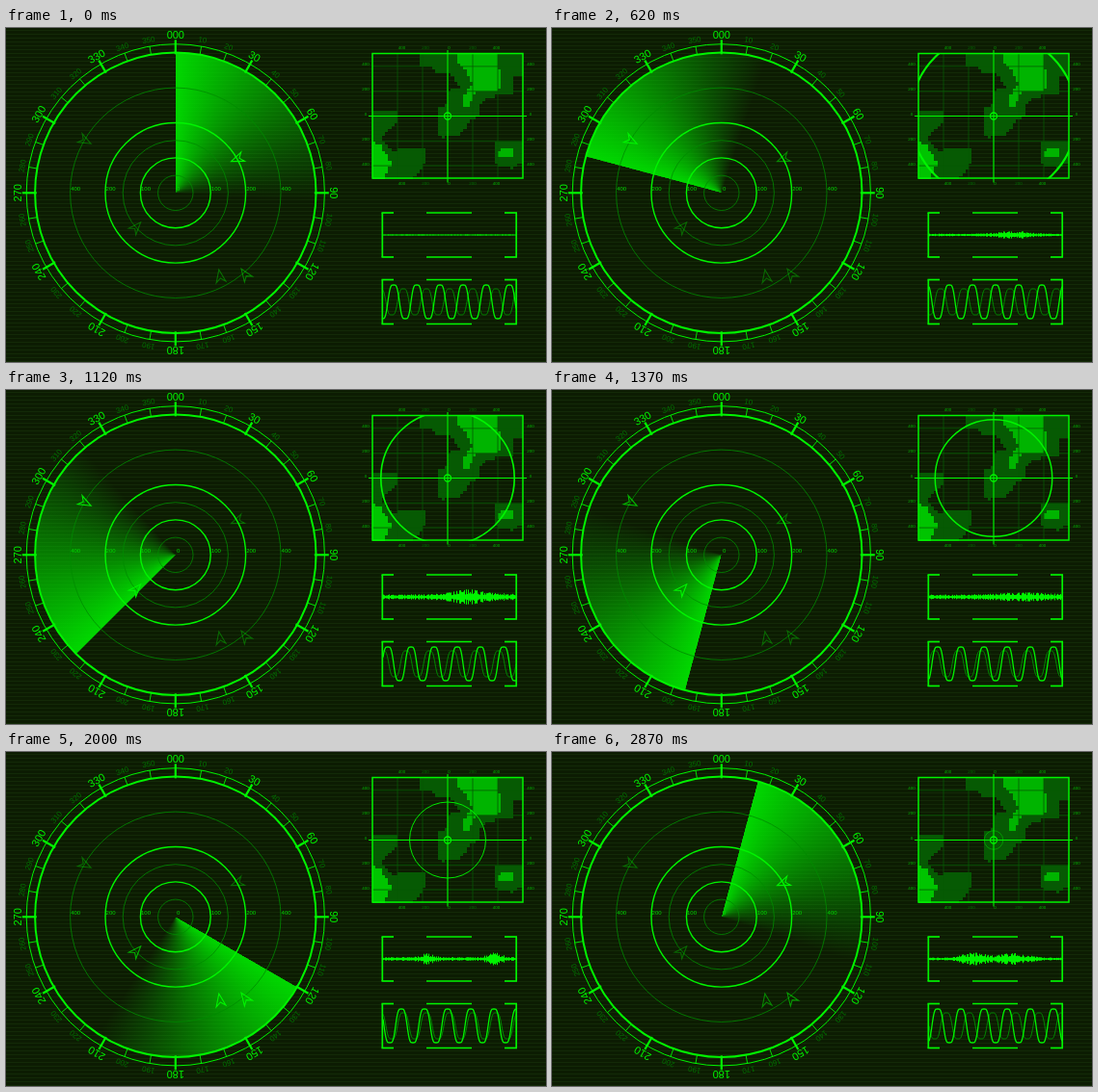
Recreate the animation shown at these times as an HTML page with a canvas. Size 560x347 px, loop 3000 ms.

```html
<!DOCTYPE html>
<html lang="en">
<head>
<meta charset="utf-8">
<title>Radar console</title>
<style>
html, body { margin: 0; width: 100%; height: 100%; overflow: hidden; background: #0c1c02; }
canvas, svg { position: absolute; left: 0; top: 0; width: 560px; height: 347px; }
text { font-family: "Liberation Sans", Arial, sans-serif; text-anchor: middle; }
</style>
</head>
<body>
<canvas id="stage" width="560" height="347"></canvas>
<svg id="labels" viewBox="0 0 560 347"></svg>
<script>
const ctx = document.getElementById('stage').getContext('2d');
const labels = document.getElementById('labels');
const W = 560, H = 347, LOOP = 3000, STEPS = 24;
const CX = 175.8, CY = 171.3, R = 145.7, UNIT = 36.4;
const MAP = { x: 380, y: 27, w: 156, h: 129.5, cx: 458, cy: 91.5 };
const GREEN = '#00f400', MID = '#008c00', DIM = '#007000';
const rad = deg => deg * Math.PI / 180;
const starts = Array.from({ length: STEPS }, (_, i) => Math.floor(i * 12.5) * 10);

function line(c, x1, y1, x2, y2, color, width) {
  c.strokeStyle = color;
  c.lineWidth = width;
  c.beginPath();
  c.moveTo(x1, y1);
  c.lineTo(x2, y2);
  c.stroke();
}

function ring(c, x, y, r, color, width) {
  c.strokeStyle = color;
  c.lineWidth = width;
  c.beginPath();
  c.arc(x, y, r, 0, 2 * Math.PI);
  c.stroke();
}

function layer(paint) {
  const cv = document.createElement('canvas');
  cv.width = W;
  cv.height = H;
  paint(cv.getContext('2d'));
  return cv;
}

function label(str, x, y, size, color, turn = 0) {
  const el = document.createElementNS('http://www.w3.org/2000/svg', 'text');
  el.textContent = str;
  el.setAttribute('font-size', size);
  el.setAttribute('fill', color);
  el.setAttribute('transform', `translate(${x} ${y}) rotate(${turn})`);
  el.setAttribute('y', size * 0.36);
  labels.append(el);
}

// Terrain outlines, filled cell by cell for the blocky look.
const land = [
  ['#065a03', 'M430 27H536V50H527V70H516L497 72L492 80L490 93L478 98L474 109L450 114L448 84L457 80V66L470 62L462 47L444 46L442 40H430Z'],
  ['#065a03', 'M380 87H405V99L396 107L388 112L392 120L403 130L408 124H435V138L430 148L420 156H380Z'],
  ['#065a03', 'M508 117H536V138L526 146L510 143L505 132Z'],
  ['#00b400', 'M466 27H509V42L513 46V64L498 67L486 67L480 81L473 81L477 66L483 58L476 44L470 38Z'],
  ['#00c400', 'M380 119L388 122L394 130L399 138L397 147L391 156H380Z'],
  ['#00b400', 'M511 128L515 124H521L527 127V133H511Z']
];

const backdrop = layer(c => {
  c.fillStyle = '#0c1c02';
  c.fillRect(0, 0, W, H);
  c.fillStyle = '#132a07';
  for (let y = 2; y < H; y += 4) c.fillRect(0, y, W, 1);

  const cell = 3.25;
  for (const [color, d] of land) {
    const shape = new Path2D(d);
    c.fillStyle = color;
    for (let x = MAP.x; x < MAP.x + MAP.w; x += cell)
      for (let y = MAP.y; y < MAP.y + MAP.h; y += cell)
        if (c.isPointInPath(shape, x + cell / 2, y + cell / 2)) {
          const px = Math.round(x), py = Math.round(y);
          c.fillRect(px, py, Math.round(x + cell) - px, Math.round(y + cell) - py);
        }
  }
  for (let i = -2; i <= 2; i++) {
    const x = MAP.cx + i * 26, y = MAP.cy + i * 25.8;
    line(c, x, MAP.y, x, MAP.y + MAP.h, '#065a03', 0.8);
    line(c, MAP.x, y, MAP.x + MAP.w, y, '#065a03', 0.8);
  }
});

const dial = layer(c => {
  ring(c, CX, CY, R, GREEN, 2);
  ring(c, CX, CY, 154.6, GREEN, 1);
  [0.5, 1.5, 3].forEach(u => ring(c, CX, CY, u * UNIT, MID, 0.8));
  [1, 2].forEach(u => ring(c, CX, CY, u * UNIT, GREEN, 1.4));
  for (let a = 0; a < 360; a += 10) {
    const major = a % 30 === 0, s = Math.sin(rad(a)), k = -Math.cos(rad(a));
    const [r1, r2] = major ? [144, 159] : [146, 154.5];
    line(c, CX + s * r1, CY + k * r1, CX + s * r2, CY + k * r2, GREEN, major ? 2.2 : 0.9);
  }
});

const frames = layer(c => {
  c.strokeStyle = GREEN;
  c.lineWidth = 1.5;
  c.strokeRect(MAP.x, MAP.y - 0.5, MAP.w, MAP.h);
  line(c, MAP.x - 4, MAP.cy, MAP.x + MAP.w + 4, MAP.cy, GREEN, 1.1);
  line(c, MAP.cx, MAP.y - 4, MAP.cx, MAP.y + MAP.h + 4, GREEN, 1.1);
  ring(c, MAP.cx, MAP.cy, 3.5, GREEN, 1.3);
  for (const top of [192, 261.5]) {
    const bottom = top + 46;
    for (const y of [top, bottom])
      for (const [a, b] of [[389.5, 402], [436, 483], [517, 530]]) line(c, a, y, b, y, GREEN, 1.7);
    for (const x of [390.3, 529.2]) line(c, x, top, x, bottom, GREEN, 1.7);
  }
});

for (let a = 0; a < 360; a += 10) {
  const major = a % 30 === 0, r = major ? 164 : 161.5;
  label(a ? a : '000', CX + r * Math.sin(rad(a)), CY - r * Math.cos(rad(a)),
    major ? 11 : 8, major ? GREEN : DIM, a);
}
for (const u of [-3, -2, -1, 1, 2, 3])
  label(Math.abs(u) === 3 ? 400 : Math.abs(u) * 100, CX + u * UNIT + 5.6, 166.6, 6, '#00d800');
label(0, 178.7, 166.6, 6, '#00d800');
for (let i = -2; i <= 2; i++) {
  const n = Math.abs(i) * 200, x = MAP.cx + 1.5 + i * 24.5, y = MAP.cy + i * 26 - 2.5;
  const color = i % 2 ? DIM : '#00b800';
  label(n, x, 20.7, 4.4, color);
  label(n, x, 161.8, 4.4, color);
  label(n, 373, y, 4.4, '#00b800');
  label(n, 544, y, 4.4, '#00b800');
}

// x, y, heading
const contacts = [[240, 136, 248], [82, 117, 118], [135, 207, 42], [222, 258, 350], [248, 256, 325]];

function drawContact([x, y, turn], heading) {
  const bearing = Math.atan2(x - CX, CY - y) * 180 / Math.PI;
  const past = (bearing - heading + 720) % 360;
  ctx.save();
  ctx.translate(x, y);
  ctx.rotate(rad(turn));
  ctx.globalAlpha = Math.min(1, Math.max(0.35, 1 - (past - 65) / 140));
  ctx.strokeStyle = GREEN;
  ctx.lineWidth = 1.1;
  ctx.beginPath();
  ctx.moveTo(0, -7);
  ctx.lineTo(5, 6);
  ctx.lineTo(0, 2);
  ctx.lineTo(-5, 6);
  ctx.closePath();
  ctx.stroke();
  ctx.restore();
}

function drawSweep(heading) {
  const from = rad(heading - 90);
  const g = ctx.createConicGradient(from, CX, CY);
  g.addColorStop(0, 'rgba(0,225,0,.95)');
  g.addColorStop(0.26, 'rgba(0,225,0,0)');
  ctx.fillStyle = g;
  ctx.beginPath();
  ctx.moveTo(CX, CY);
  ctx.arc(CX, CY, R, from, from + rad(94));
  ctx.fill();
}

function drawPulse(step) {
  const r = 107.5 - 4.25 * step;
  ctx.save();
  ctx.beginPath();
  ctx.rect(MAP.x, MAP.y, MAP.w, MAP.h);
  ctx.clip();
  ring(ctx, MAP.cx, MAP.cy, r, GREEN, Math.max(0.4, r * 0.024));
  ctx.restore();
}

// step, base level, then bursts as [x, height, spread]
const bursts = [
  [4, 0], [7, 2.5, [478, 8, 20]], [11, 1.8, [490, 2.2, 40]],
  [14, 4, [437, 11, 10], [507, 13, 10]], [17, 0], [21, 0],
  [23, 0.8, [437, 5, 16], [478, 4.5, 20]], [25, 0]
];

function level([, base, ...peaks], x) {
  return peaks.reduce((sum, [px, h, s]) => sum + h * Math.exp(-(((x - px) / s) ** 2)), base);
}

function drawSignal(step) {
  const next = Math.max(1, bursts.findIndex(b => b[0] > step));
  const a = bursts[next - 1], b = bursts[next];
  const mix = Math.max(0, (step - a[0]) / (b[0] - a[0]));
  let seed = 71 + step * 977;
  const rnd = () => (seed = (seed * 16807) % 2147483647) / 2147483647;
  rnd();
  line(ctx, 391, 215, 529, 215, '#00a000', 1);
  for (let x = 391.5; x < 529; x++) {
    const amp = level(a, x) * (1 - mix) + level(b, x) * mix;
    const h = 0.2 + 0.4 * rnd() + amp * (0.3 + 0.8 * rnd());
    line(ctx, x, 215 - h, x, 215 + h, GREEN, 1);
  }
}

// A cosine with flattened crests and steep flanks.
function drawWave(peak, amp, color, width) {
  ctx.strokeStyle = color;
  ctx.lineWidth = width;
  ctx.beginPath();
  for (let x = 391; x <= 529; x += 0.5)
    ctx.lineTo(x, 284.5 - amp * Math.sin(Math.PI / 2 * Math.cos((x - peak) * Math.PI / 12)));
  ctx.stroke();
}

function draw(step) {
  const heading = (360 - step * 15) % 360;
  ctx.drawImage(backdrop, 0, 0);
  drawSweep(heading);
  ctx.drawImage(dial, 0, 0);
  contacts.forEach(c => drawContact(c, heading));
  drawPulse(step);
  drawSignal(step);
  drawWave(412 + 3 * step, 13.5, MID, 1);
  drawWave(402 + 2 * step, 17.5, GREEN, 1.3);
  ctx.drawImage(frames, 0, 0);
}

let shown = -1;
function tick() {
  const t = performance.now() % LOOP;
  const step = starts.filter(s => s <= t).length - 1;
  if (step !== shown) draw(shown = step);
  requestAnimationFrame(tick);
}
tick();
</script>
</body>
</html>
```
